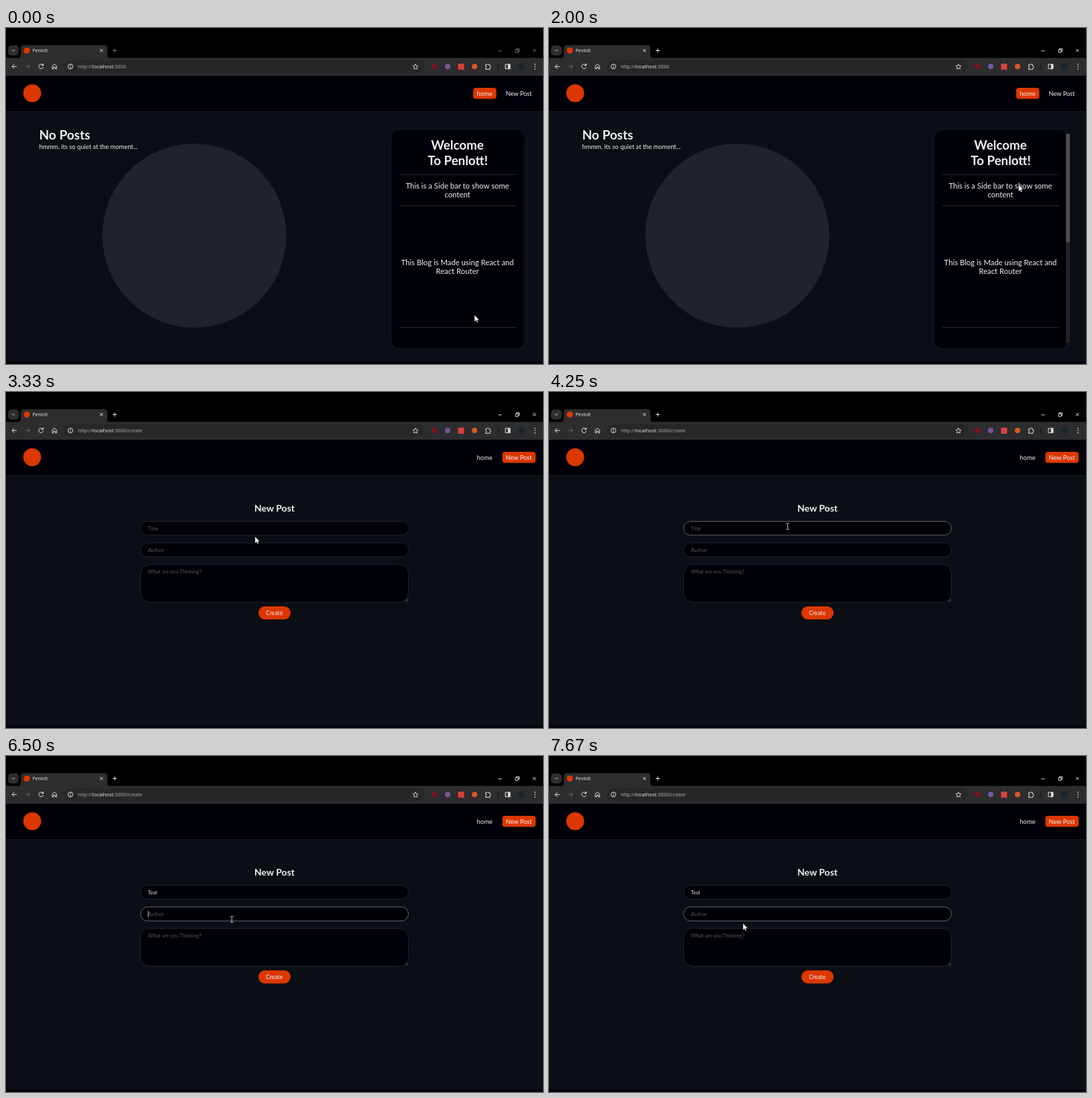
An HTML page for the animation above (8 s loop, 800 by 500 pixels).

```html
<!DOCTYPE html>
<html lang="en">
<head>
<meta charset="utf-8">
<title>Penlott</title>
<style>
  html, body { margin: 0; width: 100%; height: 100%; overflow: hidden; background: #000; }
  svg { display: block; width: 800px; height: 500px; }
  text { font-family: Lato, "Open Sans", sans-serif; fill: #f1f1f3; white-space: pre; }
  .ui { font-family: "Open Sans", "Noto Sans", sans-serif; }
  .mid { text-anchor: middle; }
  .bold { font-weight: 700; }
  .hint { fill: #55575c; font-size: 7.7px; }
  .icon { fill: none; stroke: #e6e6e8; stroke-width: 1; }
  .field { fill: #000008; stroke: #20232b; }
  .rule { stroke: #2b2d33; }
</style>
</head>
<body>
<svg viewBox="0 0 800 500">
  <defs>
    <linearGradient id="glowFill" x2="0" y2="1">
      <stop offset="0" stop-color="#dc3700" stop-opacity="0"/>
      <stop offset=".5" stop-color="#c43a12"/>
      <stop offset="1" stop-color="#dc3700" stop-opacity="0"/>
    </linearGradient>
  </defs>

  <!-- browser frame -->
  <rect width="800" height="500"/>
  <path d="M18 44.500q4 0 4-4V30q0-4.500 4.500-4.500h120q4.500 0 4.500 4.500v10.500q0 4 4 4H800V71H0V44.500z" fill="#2d2c2f"/>
  <rect x="3" y="26" width="16" height="15" rx="5" fill="#2d2c2f"/>
  <rect x="86" y="48" width="538" height="18.500" rx="9.250" fill="#272729"/>
  <circle cx="31" cy="33.500" r="4.600" fill="#dc3700"/>
  <text class="ui" x="39.500" y="36" font-size="6.800">Penlott</text>
  <text class="ui" x="107" y="60" font-size="7.450"><tspan fill="#b4b4b7">http://</tspan>localhost<tspan fill="#b4b4b7">:3000<tspan id="path"></tspan></tspan></text>
  <g class="icon">
    <path d="M9 32.500l2 2 2-2M140 31.300l4.400 4.400m0-4.400l-4.400 4.400"/>
    <path d="M16 57.300H9m3.300-3.300L9 57.300l3.300 3.300"/>
    <path d="M28.500 57.300h7m-3.300-3.300l3.300 3.300-3.300 3.300" stroke="#6d6d70"/>
    <path d="M55 55.200a3.400 3.400 0 1 0 .5 2.900M55.500 53v2.700h-2.800"/>
    <path d="M69 56.500v4.300h2v-2.500h2.400v2.500h2v-4.300l-3.200-2.700z"/>
    <circle cx="96" cy="57.300" r="3.600"/><path d="M96 56.800v2.500M96 55v1"/>
    <path d="M610 53.600l1.200 2.500 2.700.4-2 1.900.5 2.700-2.400-1.300-2.400 1.300.5-2.700-2-1.900 2.700-.4z" stroke-width=".9"/>
    <path d="M714.500 54.800h2a1.200 1.200 0 0 1 2.400 0h2v2.200a1.200 1.200 0 0 1 0 2.400v2h-6.400v-2a1.200 1.200 0 0 0 0-2.400z"/>
    <path d="M744 54h7v6.700h-7z"/><path d="M749.300 54v6.700" stroke-width="3"/>
    <path d="M733 53v9" stroke="#111113"/>
    <path d="M788 53.300v1.400m0 2v1.400m0 2v1.400" stroke-width="1.500"/>
  </g>
  <circle cx="638" cy="57.300" r="4" fill="#7c1220"/>
  <circle cx="658" cy="57.300" r="4" fill="#765799"/>
  <rect x="673.500" y="53" width="9" height="9" fill="#d9413c"/>
  <circle cx="698" cy="57.300" r="4" fill="#d85a24"/>
  <circle cx="768" cy="57.300" r="5" fill="#182631"/>
  <path id="windowIcons" class="icon" d="M159 33.500h6m-3-3v6M733.500 34h5M759 32.300h4v4h-4zm1.500 0v-1.500h4v4H763M785 31.300l4.400 4.400m0-4.400l-4.400 4.400" stroke-width=".9"/>

  <!-- page -->
  <rect y="71" width="800" height="429" fill="#0b0e15"/>
  <rect y="71" width="800" height="53" fill="#000008"/>
  <path d="M0 124.500H800" stroke="#191c23"/>
  <rect y="496" width="800" height="4" fill="#04060c"/>
  <circle cx="39" cy="97" r="13.300" fill="#dc3700"/>
  <rect id="homePill" x="696" y="89" width="34.500" height="16.500" rx="4"/>
  <rect id="postPill" x="739.500" y="89" width="49.500" height="16.500" rx="4"/>
  <text class="mid" x="713" y="100.700" font-size="9.500">home</text>
  <text class="mid" x="764" y="100.700" font-size="9.200">New Post</text>

  <g id="homePage">
    <circle cx="280.500" cy="309" r="137" fill="#20232a"/>
    <text class="bold" x="49.500" y="166" font-size="19">No Posts</text>
    <text x="49.500" y="179.500" font-size="9.350">hmmm, its so quiet at the moment...</text>
    <rect x="572.500" y="149.500" width="203" height="328" rx="13" fill="#090b12" stroke="#161920"/>
    <rect id="glow" x="572" width="2" height="42" fill="url(#glowFill)"/>
    <rect x="575" y="152.500" width="196" height="324.500" rx="12" fill="#000008"/>
    <g class="mid">
      <g class="bold" font-size="18.700">
        <text x="672.500" y="181">Welcome</text>
        <text x="673" y="203.500">To Penlott!</text>
      </g>
      <g font-size="11.300">
        <text x="672.500" y="238.500">This is a Side bar to show some</text>
        <text x="672.500" y="252">content</text>
        <text x="672.500" y="352.500">This Blog is Made using React and</text>
        <text x="672.500" y="366">React Router</text>
      </g>
    </g>
    <path class="rule" d="M586 218h174M586 264.500h174M586 445.500h174"/>
    <g id="scrollbar">
      <rect x="770" y="157" width="6" height="312" rx="3" fill="#222226"/>
      <rect x="770" y="157" width="6" height="162" rx="3" fill="#4d4d50"/>
    </g>
  </g>

  <g id="formPage">
    <text class="mid bold" x="400" y="178" font-size="14">New Post</text>
    <rect id="titleBox" class="field" x="200.500" y="192.500" width="399" height="20.500" rx="10.250"/>
    <rect id="authorBox" class="field" x="200.500" y="224.500" width="399" height="21" rx="10.500"/>
    <rect class="field" x="200.500" y="256.500" width="399" height="56.500" rx="14"/>
    <path d="M595 312l4-4M597.500 312l1.500-1.500" stroke="#8a8a8e" stroke-width=".7"/>
    <text id="titleHint" class="hint" x="211.500" y="205.800">Title</text>
    <text id="typed" x="211.500" y="205.800" font-size="7.500"></text>
    <text class="hint" x="211.500" y="238">Author</text>
    <text class="hint" x="211.500" y="270">What are you Thinking?</text>
    <rect id="caret" width=".9" height="9" fill="#e8e8ea"/>
    <rect x="376" y="319" width="48" height="19.500" rx="9.750" fill="#dc3700"/>
    <text class="mid" x="399.700" y="331.500" font-size="8.600">Create</text>
  </g>

  <g id="cursor">
    <path id="arrow" d="M0 0v10l2.300-2 1.500 3.300 1.500-.7L3.900 7.400h3z" fill="#fff" stroke="#111" stroke-width=".4"/>
    <path id="beam" d="M-2.300-4.500h1.600l.7.600.7-.6h1.600M0-4v8M-2.300 4.500h1.600l.7-.6.7.6h1.600" fill="none" stroke="#ddd" stroke-width=".9"/>
    <path id="hand" d="M-1 1q0-1 1-1t1 1v4l3.200.7q1.100.3 1 1.500l-.6 3.300-1 2H-.3L-3.500 8q-.7-1.200.6-1.400L-1 8z" fill="#fff" stroke="#222" stroke-width=".5"/>
  </g>
</svg>
<script>
const el = {};
document.querySelectorAll('[id]').forEach(e => el[e.id] = e);

const PERIOD = 8000, OPEN = 2840, TITLE = 3750, AUTHOR = 6080;
const ORANGE = [220, 55, 0], HOVER = [58, 61, 69], CLEAR = [0, 0, 8];
const EDGE = [32, 35, 43], FOCUS = [96, 99, 104];

// time, x, y of the pointer
const track = [
  [600, 698, 427], [1080, 678, 398], [1420, 672, 388], [1620, 672, 388],
  [2080, 702, 220], [2480, 756, 97], [2880, 756, 97], [3330, 371, 215],
  [3580, 355.5, 200], [5450, 355.5, 200], [6200, 336.5, 243],
  [6500, 336.5, 243], [6830, 289, 249]
];
// time, text in the title field
const keys = [[4500, 'T'], [4670, 'Te'], [4750, 'Tes'], [4920, 'Test']];

const ramp = (t, from, to) => Math.min(1, Math.max(0, (t - from) / (to - from)));
const ease = p => p * p * (3 - 2 * p);
const mix = (a, b, p) => `rgb(${a.map((v, i) => v + (b[i] - v) * p)})`;
const show = (e, on) => e.setAttribute('visibility', on ? 'inherit' : 'hidden');
const fill = (e, color) => e.setAttribute('fill', color);

function pointer(t) {
  let i = track.findIndex(k => k[0] > t);
  if (i === 0) return track[0].slice(1);
  if (i < 0) return track[track.length - 1].slice(1);
  const a = track[i - 1], b = track[i], p = ease(ramp(t, a[0], b[0]));
  return [a[1] + (b[1] - a[1]) * p, a[2] + (b[2] - a[2]) * p];
}

function draw(t) {
  const form = t >= OPEN;
  show(el.homePage, !form);
  show(el.formPage, form);
  el.path.textContent = form ? '/create' : '';
  el.windowIcons.style.stroke = t < 750 ? '#77777a' : '#e6e6e8';

  const [x, y] = pointer(t);
  const overPost = x > 739 && y > 89 && y < 106;
  const overField = form && x > 200 && x < 600 && y > 192 && y < 313 &&
    !(y > 213 && y < 224) && !(y > 245.5 && y < 256);
  el.cursor.setAttribute('transform', `translate(${x} ${y})`);
  show(el.hand, overPost);
  show(el.beam, overField);
  show(el.arrow, !overPost && !overField);

  const swap = ramp(t, OPEN, OPEN + 300);
  fill(el.homePill, mix(ORANGE, CLEAR, swap));
  fill(el.postPill, form ? mix(HOVER, ORANGE, swap) : mix(CLEAR, HOVER, ramp(t, 2420, 2600)));

  show(el.scrollbar, !form && t >= 740 && y > 149);
  el.glow.setAttribute('y', 285 - 62 * ramp(t, 700, 1420));
  el.glow.setAttribute('opacity', .8 * ramp(t, 740, 1000) * (1 - ramp(t, 1150, 1420)));

  const leave = ramp(t, AUTHOR, AUTHOR + 150);
  el.titleBox.style.stroke = mix(EDGE, FOCUS, ramp(t, TITLE - 60, TITLE + 80) - leave);
  el.authorBox.style.stroke = mix(EDGE, FOCUS, leave);

  const pressed = keys.filter(k => t >= k[0]);
  const text = pressed.length ? pressed[pressed.length - 1][1] : '';
  if (el.typed.textContent !== text) el.typed.textContent = text;
  show(el.titleHint, !text);

  // the caret restarts its blink at each focus or key press
  const inAuthor = t >= AUTHOR;
  const since = inAuthor ? AUTHOR : t >= 5000 ? 5000 : t >= 4500 ? 4500 : TITLE;
  show(el.caret, t >= TITLE && Math.floor((t - since) / 500) % 2 === 0);
  const width = !inAuthor && text ? el.typed.getComputedTextLength() : 0;
  el.caret.setAttribute('x', 211.5 + width);
  el.caret.setAttribute('y', inAuthor ? 230.5 : 198.5);
}

const start = performance.now();
function frame(now) {
  draw(Math.max(0, now - start) % PERIOD);
  requestAnimationFrame(frame);
}
draw(0);
requestAnimationFrame(frame);
</script>
</body>
</html>
```
